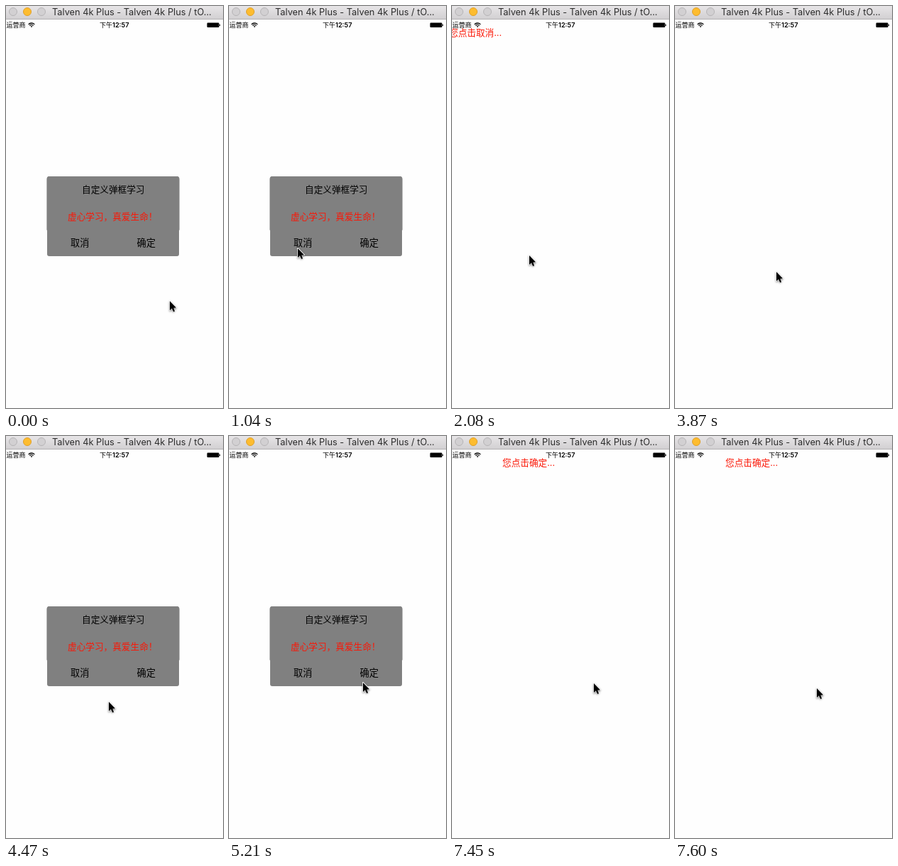
An HTML page with a canvas for the animation above (8000 ms loop, 306x564 px).

```html
<!DOCTYPE html>
<html lang="zh-CN">
<head>
<meta charset="utf-8">
<style>
html, body { margin: 0; width: 100%; height: 100%; overflow: hidden; background: #fefefe; }
canvas { display: block; width: 306px; height: 564px; }
</style>
</head>
<body>
<canvas id="stage"></canvas>
<script>
const W = 306, H = 564, LOOP = 8000, STEP = 148;
const CANCEL_CLICK = 1190, LABEL_END = 3280, REOPEN = 4470, CONFIRM_CLICK = 7450;
const CJK = '"Noto Sans CJK SC", "Noto Sans CJK", sans-serif';
const MIXED = 'Inter, ' + CJK;
const RED = '#fb1605';

const canvas = document.getElementById('stage');
const ratio = window.devicePixelRatio || 1;
canvas.width = W * ratio;
canvas.height = H * ratio;
const ctx = canvas.getContext('2d');
ctx.scale(ratio, ratio);

const point = (x, y) => ({ x, y });
const ease = p => p * p * (3 - 2 * p);

// Eased progress that advances in held steps, as a low frame rate recording does.
function glide(t, begin, steps) {
  const done = Math.floor((t - begin) / STEP) + 1;
  return ease(Math.min(Math.max(done / steps, 0), 1));
}

function cursorAt(t) {
  const pos = point(231, 414);
  const moveTo = (goal, begin, steps) => {
    const p = glide(t, begin, steps);
    pos.x += (goal.x - pos.x) * p;
    pos.y += (goal.y - pos.y) * p;
  };
  const overCancel = point(97, 340), released = point(102, 348), rest = point(109, 350);
  const below = point(143, 373), overConfirm = point(200, 339), end = point(200, 354);

  moveTo(overCancel, 150, 7);
  moveTo(released, CANCEL_CLICK, 1);
  moveTo(rest, 1340, 6);
  pos.x += 8 * Math.sin(Math.PI * glide(t, 1340, 6));
  pos.x += 4 * glide(t, 2530, 2);
  moveTo(below, 3720, 2);
  pos.x += 2 * glide(t, REOPEN, 1);
  moveTo(overConfirm, REOPEN + STEP, 7);
  moveTo(end, CONFIRM_CLICK, 2);
  return point(Math.round(pos.x), Math.round(pos.y));
}

function text(str, x, y, size, color = '#000', family = CJK, weight = 400) {
  ctx.font = `${weight} ${size}px ${family}`;
  ctx.fillStyle = color;
  ctx.fillText(str, x, y);
}

function box(x, y, w, h, radius, color) {
  ctx.fillStyle = color;
  ctx.beginPath();
  ctx.roundRect(x, y, w, h, radius);
  ctx.fill();
}

function light(x, fill, edge) {
  ctx.beginPath();
  ctx.arc(x, 8, 5.5, 0, Math.PI * 2);
  ctx.fillStyle = fill;
  ctx.fill();
  ctx.strokeStyle = edge;
  ctx.lineWidth = 1;
  ctx.stroke();
}

function titleBar() {
  const shade = ctx.createLinearGradient(0, 0, 0, 18);
  shade.addColorStop(0, '#e7e5e7');
  shade.addColorStop(1, '#d2d0d2');
  ctx.fillStyle = shade;
  ctx.fillRect(0, 0, W, 18);
  ctx.fillStyle = '#b4b2b4';
  ctx.fillRect(0, 18, W, 1);
  light(10, '#d2d0d2', '#b6b4b6');
  light(30, '#fdbc2f', '#e0a02a');
  light(50, '#d2d0d2', '#b6b4b6');
  text('Talven 4k Plus - Talven 4k Plus / tO...', 65, 13, 12.8, '#2c2c2c', MIXED);
}

function wifi(x, y) {
  const from = -Math.PI * 0.76, to = -Math.PI * 0.24;
  ctx.strokeStyle = ctx.fillStyle = '#000';
  ctx.lineWidth = 1.3;
  for (const r of [3.6, 6]) {
    ctx.beginPath();
    ctx.arc(x, y, r, from, to);
    ctx.stroke();
  }
  ctx.beginPath();
  ctx.moveTo(x, y);
  ctx.arc(x, y, 1.9, from, to);
  ctx.fill();
}

function statusBar() {
  text('运营商', 0.5, 30, 9);
  wifi(36, 30);
  text('下午', 132, 30, 9, '#000', CJK, 500);
  text('12:57', 150, 30, 9.2, '#000', MIXED, 600);
  box(283.5, 23.5, 17, 6.5, 1.2, '#000');
  box(301, 25.5, 1, 2.5, 0.5, '#000');
}

function dialog() {
  box(58, 239, 186, 112, 3, '#808080');
  box(57.4, 239, 187.2, 75.5, [4, 4, 0, 0], '#808080');
  text('自定义弹框学习', 107, 262, 12.65);
  text('虚心学习，真爱生命！', 87, 300, 12.65, RED);
  text('取消', 91, 337, 13.2);
  text('确定', 184.5, 337, 13.2);
}

const label = (str, x) => text(str, x, 42, 12.65, RED, MIXED);

const head = new Path2D('M0 0V13L3.2 10L9 9.2Z');
const tail = new Path2D('M3.6 8.5L6 14.6');

function arrow(color, border) {
  ctx.strokeStyle = ctx.fillStyle = color;
  ctx.lineWidth = 2.2 + border;
  ctx.stroke(tail);
  ctx.lineWidth = border;
  if (border) ctx.stroke(head);
  ctx.fill(head);
}

function cursor({ x, y }) {
  ctx.save();
  ctx.translate(x, y);
  ctx.lineJoin = 'round';
  ctx.shadowColor = 'rgba(0,0,0,0.35)';
  ctx.shadowBlur = 2.5 * ratio;
  ctx.shadowOffsetY = ratio;
  arrow('#fff', 1.8);
  ctx.shadowColor = 'transparent';
  arrow('#000', 0);
  ctx.restore();
}

function draw(t) {
  ctx.fillStyle = '#fefefe';
  ctx.fillRect(0, 0, W, H);
  titleBar();
  statusBar();
  if (t < CANCEL_CLICK || (t >= REOPEN && t < CONFIRM_CLICK)) dialog();
  if (t >= CANCEL_CLICK && t < LABEL_END) label('您点击取消...', -4);
  if (t >= CONFIRM_CLICK) label('您点击确定...', 71);
  cursor(cursorAt(t));
}

const origin = performance.now();
function frame() {
  draw((performance.now() - origin) % LOOP);
  requestAnimationFrame(frame);
}
frame();
</script>
</body>
</html>
```
